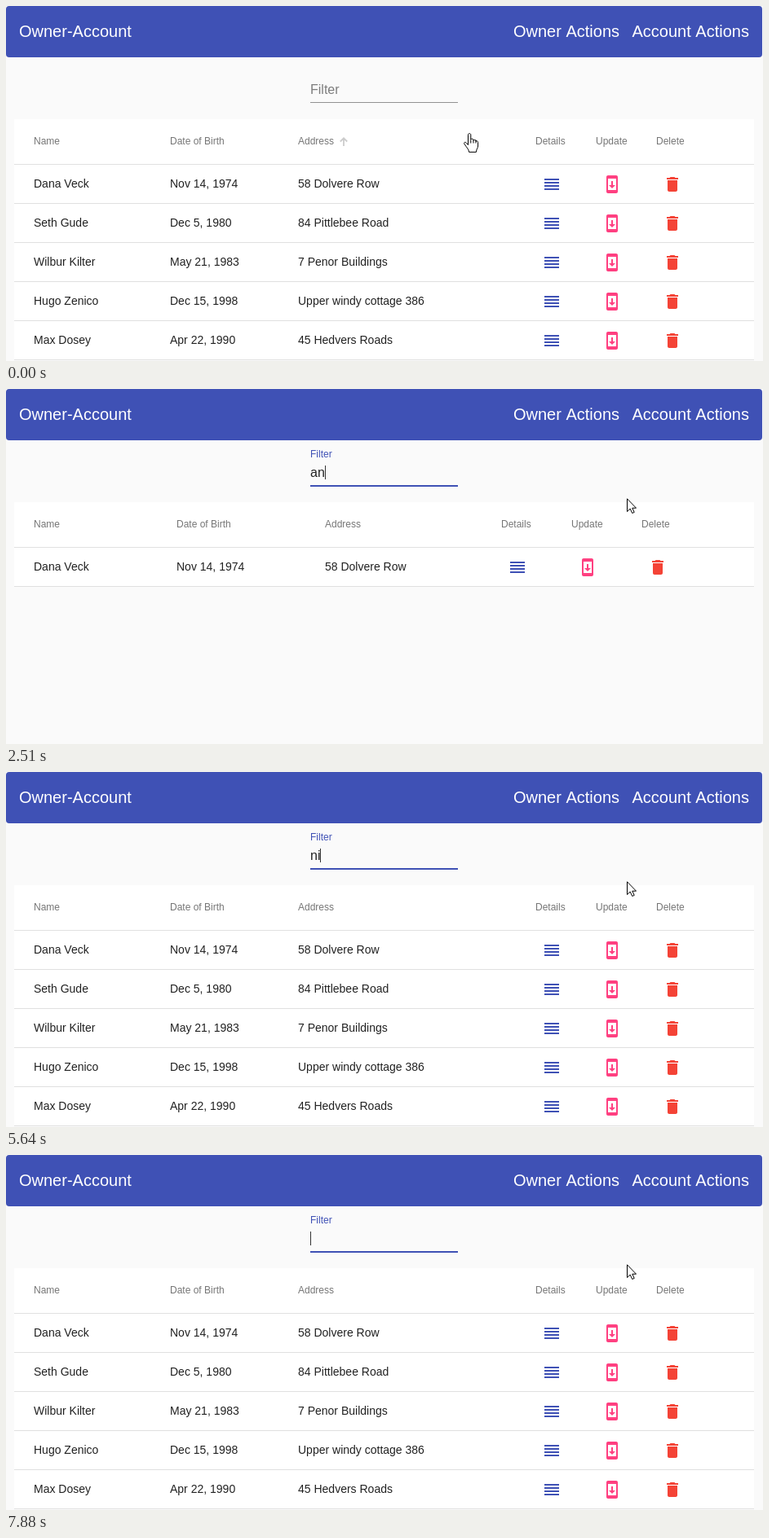
An HTML page with a canvas that plays this animation: 928x436 px, repeating every 8000 ms.

```html
<!DOCTYPE html>
<html lang="en">
<head>
<meta charset="utf-8">
<title>Owner-Account</title>
<style>
  html, body { margin: 0; width: 100%; height: 100%; overflow: hidden; background: #fafafa; }
  canvas { display: block; width: 928px; height: 436px; }
</style>
</head>
<body>
<canvas id="stage" width="928" height="436"></canvas>
<script>
const ctx = document.getElementById('stage').getContext('2d');
const LOOP = 8000;
const BLUE = '#3f51b5', PINK = '#ff4081', RED = '#f44336';
const INK = 'rgba(0,0,0,.87)', MUTED = 'rgba(0,0,0,.54)', RULE = 'rgba(0,0,0,.12)';

const rows = [
  ['Dana Veck', 'Nov 14, 1974', '58 Dolvere Row'],
  ['Seth Gude', 'Dec 5, 1980', '84 Pittlebee Road'],
  ['Wilbur Kilter', 'May 21, 1983', '7 Penor Buildings'],
  ['Hugo Zenico', 'Dec 15, 1998', 'Upper windy cottage 386'],
  ['Max Dosey', 'Apr 22, 1990', '45 Hedvers Roads']
];
const heads = ['Name', 'Date of Birth', 'Address', 'Details', 'Update', 'Delete'];
const wideCols = [34, 201, 358, 649, 723, 797];
const narrowCols = [34, 209, 391, 607, 693, 779];

// start time, typed text, applied filter, caret colour
const DARK = '#333';
const states = [
  [0, '', '', ''],
  [680, '', '', DARK],
  [1190, '', '', ''],
  [1720, '', '', DARK],
  [2220, '', '', ''],
  [2460, 'a', '', DARK],
  [2510, 'an', 'an', DARK],
  [3080, 'an', 'an', ''],
  [3590, 'an', 'an', DARK],
  [3650, 'a', 'an', BLUE],
  [3720, 'a', '', BLUE],
  [3820, '', '', DARK],
  [4150, '', '', ''],
  [4650, '', '', DARK],
  [5190, '', '', ''],
  [5580, 'n', '', DARK],
  [5640, 'ni', '', DARK],
  [5770, 'nic', 'nic', DARK],
  [6270, 'nic', 'nic', ''],
  [6630, 'ni', 'nic', ''],
  [6810, 'n', 'nic', BLUE],
  [6890, 'n', '', BLUE],
  [6950, '', '', DARK],
  [7320, '', '', ''],
  [7880, '', '', DARK]
];

const icons = [
  [8, BLUE, new Path2D('M3 15h18v-2H3zm0 4h18v-2H3zm0-8h18V9H3zm0-6v2h18V5z')],
  [8, PINK, new Path2D('M17 1H7C5.9 1 5 1.9 5 3v18c0 1.1.9 2 2 2h10c1.1 0 2-.9 2-2V3c0-1.1-.9-2-2-2zM17 19H7V5h10zm-1-6h-3V8h-2v5H8l4 4z')],
  [8, RED, new Path2D('M6 19c0 1.1.9 2 2 2h8c1.1 0 2-.9 2-2V7H6zM19 4h-3.5l-1-1h-5l-1 1H5v2h14z')]
];
const arrowShape = new Path2D('M.5.8V16.6L4.2 13.1 6.7 18.5 9.2 17.4 6.8 12.2H11.5Z');
const handShape = new Path2D('M5.5 2.2C5.5.1 8.8.1 8.8 2.2V8.2C9.2 6.5 12 6.8 12 8.6V9.2C12.6 7.8 15 8.2 15 9.8V10.4C15.8 9.2 17.6 9.8 17.6 11.5V16C17.6 18.5 15.6 19.5 15.4 23.4H6.6C6.4 20 4.2 18.6 2.8 16.2L.8 13.2C0 11.6 2 10.6 3.2 12L5.5 14.6Z');

// Progress that advances in n jumps, the first at a and the last at b.
function stepped(t, a, b, n) {
  if (t < a) return 0;
  return Math.min(1, (1 + Math.floor((t - a) / (b - a) * (n - 1) + 1e-6)) / n);
}
const mix = (a, b, p) => a + (b - a) * p;
const easeOut = p => 1 - (1 - p) ** 3;

function box(x, y, w, h, color) {
  ctx.fillStyle = color;
  ctx.fillRect(x, y, w, h);
}

function text(str, x, y, size, color) {
  ctx.font = size + 'px "Liberation Sans", Arial, sans-serif';
  ctx.fillStyle = color;
  ctx.fillText(str, x, y);
}

function toolbar() {
  ctx.fillStyle = BLUE;
  ctx.beginPath();
  ctx.roundRect(0, 0, 927, 63, 4);
  ctx.fill();
  text('Owner-Account', 16, 38, 20, '#fff');
  text('Owner Actions', 622, 38, 20, '#fff');
  text('Account Actions', 767.5, 38, 20, '#fff');
}

function filterField(t, typed, caret) {
  const p = easeOut(stepped(t, 600, 830, 4));
  text('Filter', 373, mix(108, 84, p), mix(16, 12, p), p ? BLUE : 'rgba(0,0,0,.5)');
  box(373, 118, 181, 1, 'rgba(0,0,0,.42)');
  if (p) {
    const w = 181 * mix(.5, 1, p);
    box(463.5 - w / 2, 118, w, 2, BLUE);
  }
  text(typed, 373, 108, 16, INK);
  if (caret) box(373 + Math.round(ctx.measureText(typed).width), 94, 1, 17, caret);
}

function sortArrow(alpha) {
  if (alpha <= 0) return;
  ctx.save();
  ctx.globalAlpha = alpha;
  ctx.strokeStyle = '#ccc';
  ctx.lineWidth = 1.8;
  ctx.beginPath();
  ctx.moveTo(414, 172);
  ctx.lineTo(414, 162.5);
  ctx.moveTo(409.8, 166.5);
  ctx.lineTo(414, 162.3);
  ctx.lineTo(418.2, 166.5);
  ctx.stroke();
  ctx.restore();
}

function table(t, query) {
  const list = rows.filter(r => r[0].toLowerCase().includes(query));
  const cols = query === 'an' ? narrowCols : wideCols;
  box(10, 139, 907, 56 + 48 * list.length, '#fff');
  box(10, 194, 907, 1, RULE);
  heads.forEach((h, i) => text(h, cols[i], 170, 12, MUTED));
  sortArrow(1 - stepped(t, 110, 410, 5));
  list.forEach((row, i) => {
    const y = 48 * i;
    row.forEach((s, c) => text(s, cols[c], 223 + y, 14, INK));
    icons.forEach(([dx, color, path], c) => {
      ctx.save();
      ctx.translate(cols[c + 3] + dx, 207 + y);
      ctx.fillStyle = color;
      ctx.fill(path, 'evenodd');
      ctx.restore();
    });
    box(10, 242 + y, 907, 1, RULE);
  });
}

function pointer(t) {
  const a = stepped(t, 110, 410, 5), b = stepped(t, 970, 1260, 5);
  const x = mix(mix(568, 532, a), 761, b);
  const y = mix(mix(156, 101, a), 134, b);
  ctx.save();
  ctx.lineWidth = 1;
  ctx.strokeStyle = '#000';
  ctx.fillStyle = '#fff';
  if (y < 120 && x < 554) {
    ctx.translate(Math.round(x), Math.round(y));
    box(0, -8, 1, 16, '#000');
    for (const end of [-9, 8]) {
      box(-3, end, 3, 1, '#000');
      box(1, end, 3, 1, '#000');
    }
  } else {
    const hand = y > 139 && x < 600;
    ctx.translate(Math.round(x) - (hand ? 7 : 0), Math.round(y));
    const shape = hand ? handShape : arrowShape;
    ctx.fill(shape);
    ctx.stroke(shape);
    if (hand) {
      ctx.beginPath();
      for (const kx of [8.8, 12, 15]) {
        ctx.moveTo(kx, 8.5);
        ctx.lineTo(kx, 12.5);
      }
      ctx.stroke();
    }
  }
  ctx.restore();
}

function draw(t) {
  const [, typed, query, caret] = states.findLast(s => s[0] <= t);
  box(0, 0, 928, 436, '#fafafa');
  toolbar();
  filterField(t, typed, caret);
  table(t, query);
  pointer(t);
}

const start = performance.now();
function tick() {
  draw((performance.now() - start) % LOOP);
  requestAnimationFrame(tick);
}
tick();
</script>
</body>
</html>
```
